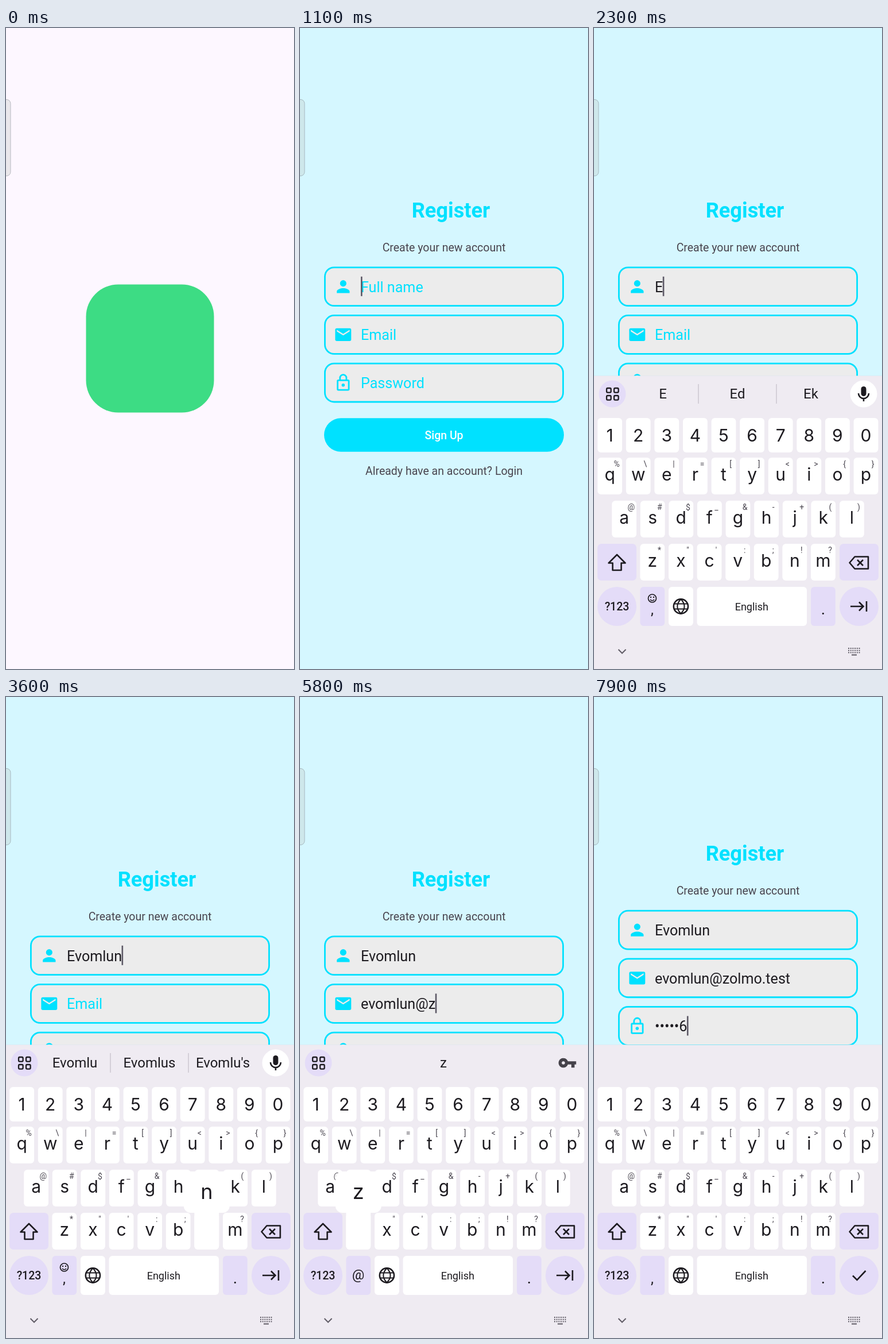
An HTML page for the animation above (8 s loop, 502 px wide and 1116 px high).

```html
<!DOCTYPE html>
<html lang="en">
<head>
<meta charset="utf-8">
<title>Sign up flow</title>
<style>
html, body { margin: 0; width: 100%; height: 100%; overflow: hidden; background: #d5f7ff; }
svg { display: block; width: 100%; height: 100%; }
text { font-family: Roboto, sans-serif; fill: #1d1b20; white-space: pre; }
.mid { text-anchor: middle; }
.title { font-size: 36.2px; font-weight: 700; fill: #00e1ff; }
.note { font-size: 19.5px; fill: #49454f; }
.btn { font-size: 19.5px; font-weight: 500; fill: #fff; }
.value { font-size: 25.1px; }
.hint { fill: #00e1ff; }
.key { font-family: Inter, sans-serif; font-size: 30px; }
.alt { font-size: 14px; fill: #49454f; }
.word { font-size: 24px; }
.line { fill: none; stroke: #1d1b20; stroke-width: 2.6; }
</style>
</head>
<body>
<svg id="stage" viewBox="0 0 502 1116" xmlns="http://www.w3.org/2000/svg"></svg>
<script>
const LOOP = 8000, CYAN = '#00e1ff', LILAC = '#e4dcf8', INK = '#1d1b20';
const DP = 1.394, FIELD = 50 * DP, PITCH = 60 * DP, TOP = 415.4;
const NAME = 'Evomlun', MAIL = 'evomlun@zolmo.test';

const ICONS = {
  person: 'M12 12a4 4 0 1 0 0-8 4 4 0 0 0 0 8zm0 2c-2.67 0-8 1.34-8 4v2h16v-2c0-2.66-5.33-4-8-4z',
  mail: 'M20 4H4a2 2 0 0 0-2 2v12a2 2 0 0 0 2 2h16a2 2 0 0 0 2-2V6a2 2 0 0 0-2-2zm0 4l-8 5-8-5V6l8 5 8-5z',
  lock: 'M18 8h-1V6A5 5 0 0 0 7 6v2H6a2 2 0 0 0-2 2v10a2 2 0 0 0 2 2h12a2 2 0 0 0 2-2V10a2 2 0 0 0-2-2zM9 6a3 3 0 0 1 6 0v2H9zm9 14H6V10h12zm-6-3a2 2 0 1 0 0-4 2 2 0 0 0 0 4z',
  pass: 'M12.65 10A6 6 0 1 0 12.65 14H17v4h4v-4h2v-4zM7 14a2 2 0 1 1 0-4 2 2 0 0 1 0 4z',
  palette: 'M12 3a9 9 0 0 0 0 18c1.4 0 1.9-1.5 1.1-2.5-.8-1 0-2.5 1.1-2.5H16a5 5 0 0 0 5-5c0-4.4-4-8-9-8z'
};

const rect = (x, y, w, h, r, fill, more = '') =>
  `<rect x="${x}" y="${y}" width="${w}" height="${h}" rx="${r}" fill="${fill}" ${more}/>`;
const disc = (x, y, r, fill, more = '') => `<circle cx="${x}" cy="${y}" r="${r}" fill="${fill}" ${more}/>`;
const line = (d, more = '') => `<path class="line" d="${d}" ${more}/>`;
const text = (x, y, cls, s, more = '') => `<text x="${x}" y="${y}" class="${cls}" ${more}>${s}</text>`;
const group = (id, body) => `<g id="${id}">${body}</g>`;
const esc = s => s.replace(/&/g, '&amp;').replace(/</g, '&lt;');
const icon = (name, x, y, fill) =>
  `<path d="${ICONS[name]}" fill="${fill}" fill-rule="evenodd" transform="translate(${x - 12 * DP} ${y - 12 * DP}) scale(${DP})"/>`;

const field = (y, glyph, hint, id = '') =>
  rect(43.4, y + DP, 415.2, FIELD - 2 * DP, 16, '#ececec', `stroke="${CYAN}" stroke-width="${2 * DP}"`) +
  icon(glyph, 75.3, y + FIELD / 2, CYAN) +
  text(106, y + 44.4, 'value hint', hint, id && `id="${id}"`);
const button = (y, label) => rect(42, y, 418, 58.6, 29.3, CYAN) + text(251, y + 36.8, 'mid btn', label);

const login = text(251, 346, 'mid title', 'Log In') +
  text(251, 405, 'mid note', 'Welcome Back! Please sign in to continue') +
  field(449.2, 'mail', 'Email') + field(449.2 + PITCH, 'lock', 'Password') + button(629.2, 'Sign In') +
  text(251, 728, 'mid note', "Don't have an account? Sign Up");

const register = text(263, 330, 'mid title', 'Register') +
  text(251, 389, 'mid note', 'Create your new account') +
  field(TOP, 'person', 'Full name', 'v0') + field(TOP + PITCH, 'mail', 'Email', 'v1') +
  field(TOP + 2 * PITCH, 'lock', 'Password', 'v2') + button(679.2, 'Sign Up') +
  text(251, 778, 'mid note', 'Already have an account? Login') +
  rect(0, 0, 2.6, 34, 0, '#5d5966', 'id="caret"');

// Keyboard
const keyAt = {};
function row(chars, x0, y, h, alts = '') {
  return [...chars].map((c, i) => {
    const x = x0 + 49.6 * i, cx = x + 21.4;
    keyAt[c] = [cx, y];
    return rect(x, y, 42.8, h, 6, '#fff') +
      text(cx, y + (h > 60 ? 40 : 41), 'mid key', c, 'data-key') +
      (alts ? text(x + 33.5, y + 16, 'mid alt', esc(alts[i])) : '');
  }).join('');
}

const tools =
  line('M107 648H98a4 4 0 0 1-4-4v-14a4 4 0 0 1 4-4h15a4 4 0 0 1 4 4v9zM107 648v-5a4 4 0 0 1 4-4h6M99 638q5 7 10 0', 'style="stroke:#9c98a1"') +
  disc(101, 633, 1.7, '#9c98a1') + disc(110, 633, 1.7, '#9c98a1') +
  text(177.5, 644, 'mid', 'GIF', 'style="font-size:19px;font-weight:900;fill:#9c98a1;letter-spacing:1px"') +
  disc(250, 637, 6.5, 'none', `stroke="${INK}" stroke-width="5.5"`) +
  disc(250, 637, 9.6, 'none', `stroke="${INK}" stroke-width="4" stroke-dasharray="6 4.053"`) +
  rect(311, 625, 24, 24, 2, INK) +
  icon('palette', 396, 637, INK) +
  [[389, 637], [392, 631], [400, 631], [403.5, 637]].map(p => disc(p[0], p[1], 2, '#efebf2')).join('');

const words = group('split', line('M182 620v34M318 620v34', 'style="stroke:#c9c4ce;stroke-width:1.4"')) +
  [120, 250, 378].map((x, i) => text(x, 645, 'mid word', '', `id="w${i}"`)).join('');

const mic = disc(470, 637, 23.5, '#fff') + rect(465.5, 624, 9, 17, 4.5, INK) +
  line('M461 636a9 9 0 0 0 18 0M470 645v5');

const gridIcon = disc(32, 637, 23.5, LILAC) +
  [22, 35].map(x => [627, 640].map(y => rect(x, y, 7.6, 7.6, 1.8, 'none', 'class="line" style="stroke-width:2.3"')).join('')).join('');

const board = rect(0, 605, 502, 520, 0, '#dfe6ee', 'opacity=".6"') + rect(0, 606, 502, 520, 0, '#efebf2') +
  group('grid', gridIcon) + group('tools', tools) + group('words', words) +
  group('mic', mic) + group('pass', icon('pass', 466, 637, '#45424a')) +
  row('1234567890', 6.2, 679, 60) +
  row('qwertyuiop', 6.2, 748, 64, '%\\|=[]<>{}') +
  row('asdfghjkl', 31.2, 823, 64, '@#$_&-+()') +
  row('zxcvbnm', 80.4, 898, 64, '*"\':;!?') +
  rect(6, 898, 68, 64, 7, LILAC) + rect(428, 898, 68, 64, 7, LILAC) +
  line('M40 917l14.5 14.5H47.5V944h-15V931.5H25.5z', 'id="shift" stroke-linejoin="round"') +
  line('M445.5 931l9-10.5H478v21H454.5zM459 926l10 10m0-10l-10 10', 'stroke-linejoin="round"') +
  disc(40, 1007, 34, LILAC) + text(40, 1014, 'mid', '?123', 'style="font-size:19.5px;font-weight:500"') +
  rect(80.4, 973, 42.8, 68, 6, LILAC) +
  group('smile', disc(101.5, 993, 7, 'none', `stroke="${INK}" stroke-width="1.7"`) +
    disc(99, 991, 1.2, INK) + disc(104, 991, 1.2, INK) + line('M98 995q3.5 4 7 0', 'style="stroke-width:1.6"')) +
  text(101.5, 1021, 'mid', ',', 'id="comma" style="font-size:25px"') +
  text(101.5, 1014, 'mid', '@', 'id="at" style="font-size:24px"') +
  rect(130, 973, 42.8, 68, 6, '#fff') +
  disc(151.4, 1007, 12.6, 'none', 'class="line"') +
  line('M151.4 994.5c-8 8-8 17 0 25c8-8 8-17 0-25M140 1002.5h23M140 1011.5h23', 'style="stroke-width:2.2"') +
  rect(179.5, 973, 191.5, 68, 6, '#fff') + text(274.8, 1014, 'mid', 'English', 'style="font-size:18px"') +
  rect(378, 973, 42.8, 68, 6, LILAC) + text(399.4, 1021, 'mid', '.', 'style="font-size:28px"') +
  disc(462, 1007, 34, LILAC) +
  line('M447 1007h22M462 999.5l7.5 7.5-7.5 7.5M475 998v18', 'id="next"') +
  line('M451 1007.5l7.5 7.5 15-16', 'id="done"') +
  line('M42.5 1082l6.5 6.5 6.5-6.5', 'style="stroke:#605c66;stroke-width:2"') +
  [0, 1, 2].map(r => [...'012345'].map(i => rect(443 + 3.7 * i, 1079 + 3.7 * r, 2, 2, 0, '#605c66')).join('')).join('') +
  rect(449, 1090.5, 9, 2, 0, '#605c66') +
  group('pop', rect(-40, -72, 80, 72, 12, '#fff') + rect(-21.4, -8, 42.8, 72, 6, '#fff') +
    text(0, -24, 'mid key', '', 'id="popText" style="font-size:36px"'));

document.getElementById('stage').innerHTML =
  group('splash', rect(0, 0, 502, 1116, 0, '#fdf7ff') + rect(139.5, 446.5, 223, 223, 56, '#3ddc84')) +
  group('app', rect(0, 0, 502, 1116, 0, '#d5f7ff') + group('login', login) + group('register', register)) +
  group('edge', rect(0, 0, 502, 1, 0, '#a9adb5')) +
  group('board', board) +
  rect(-12, 124.5, 20, 133, 7, 'rgba(190,195,190,.3)', 'stroke="rgba(125,130,140,.5)"');

const $ = id => document.getElementById(id);
const show = (id, on) => { $(id).style.display = on ? '' : 'none'; };
const clamp = v => Math.min(1, Math.max(0, v));
const ease = (t, a, b, n = 3) => 1 - (1 - clamp((t - a) / (b - a))) ** n;
const keyEls = [...document.querySelectorAll('[data-key]')];
const lower = keyEls.map(el => el.textContent);

// Keystrokes: field, characters, first press, interval, key preview
const strokes = [
  [0, 'E', 2000, 0, 1], [0, NAME.slice(1), 2900, 130, 1],
  [1, MAIL.slice(0, 4), 4200, 66, 0], [1, MAIL.slice(4, 8), 5100, 150, 1], [1, MAIL.slice(8), 5800, 65, 1],
  [2, '12345', 7000, 140, 0], [2, '6', 7900, 0, 0]
].flatMap(([f, s, at, gap, pop]) => [...s].map((c, i) => ({ f, c, t: at + gap * i, pop })));
const resets = [1100, 2300, 3900, 6800, ...strokes.map(s => s.t)];
const typed = (f, t) => strokes.filter(s => s.f === f && s.t <= t).map(s => s.c).join('');

// The newest password digit stays readable for a moment
function mask(s, t) {
  const open = t >= 7800 && t < 7900 ? 0 : 1;
  return s && '•'.repeat(s.length - open) + (open ? s.slice(-1) : '');
}

function drawFields(t, focus) {
  ['Full name', 'Email', 'Password'].forEach((hint, i) => {
    const raw = typed(i, t), val = i === 2 ? mask(raw, t) : raw, el = $('v' + i);
    el.textContent = val || hint;
    el.setAttribute('class', val ? 'value' : 'value hint');
    if (i === focus) {
      const x = val ? 105.5 + el.getComputedTextLength() : 106;
      $('caret').setAttribute('transform', `translate(${x} ${TOP + 17.4 + PITCH * i})`);
    }
  });
  const last = Math.max(...resets.filter(r => r <= t), 0);
  show('caret', (t - last) % 1200 < 600);
}

function drawBar(t, focus) {
  const name = typed(0, t - 100), mail = typed(1, t);
  let list = [];
  if (focus === 0 && name) list = name === 'E' ? ['E', 'Ed', 'Ek'] : [name, name + 's', name + "'s"];
  if (focus === 1 && mail && t < 6480) list = ['', mail.split('@').pop(), ''];
  for (let i = 0; i < 3; i++) $('w' + i).textContent = list[i] || '';
  show('split', focus === 0);
  show('words', list.length);
  show('tools', focus < 2 && !list.length);
  show('grid', focus < 2);
  show('mic', focus === 0);
  show('pass', focus === 1);
  show('smile', focus === 0);
  show('comma', focus !== 1);
  show('at', focus === 1);
  show('next', focus < 2);
  show('done', focus === 2);
}

function drawKeys(t) {
  const caps = t >= 1700 && t < 2000;
  keyEls.forEach((el, i) => { el.textContent = caps ? lower[i].toUpperCase() : lower[i]; });
  $('shift').style.fill = caps ? INK : 'none';
  const hit = strokes.find(s => s.pop && t >= s.t && t < s.t + 80);
  const key = hit && keyAt[hit.c.toLowerCase()];
  show('pop', key);
  if (key) {
    $('pop').setAttribute('transform', `translate(${Math.min(key[0], 462)} ${key[1]})`);
    $('popText').textContent = hit.c;
  }
}

function draw(t) {
  const focus = t < 3900 ? 0 : t < 6800 ? 1 : 2;
  $('app').style.opacity = ease(t, 80, 330, 4);
  show('edge', t >= 100 && t < 300);
  const swap = ease(t, 800, 1080);
  $('login').style.opacity = 1 - swap;
  $('register').style.opacity = swap;
  $('register').setAttribute('transform', `translate(${50 * (1 - swap)} ${-44.6 * ease(t, 6780, 7000)})`);
  show('board', t > 1130);
  $('board').setAttribute('transform', `translate(0 ${512 * (1 - ease(t, 1130, 1500))})`);
  drawFields(t, focus);
  drawBar(t, focus);
  drawKeys(t);
}

const start = performance.now();
function tick() {
  draw((performance.now() - start) % LOOP);
  requestAnimationFrame(tick);
}
tick();
</script>
</body>
</html>
```
